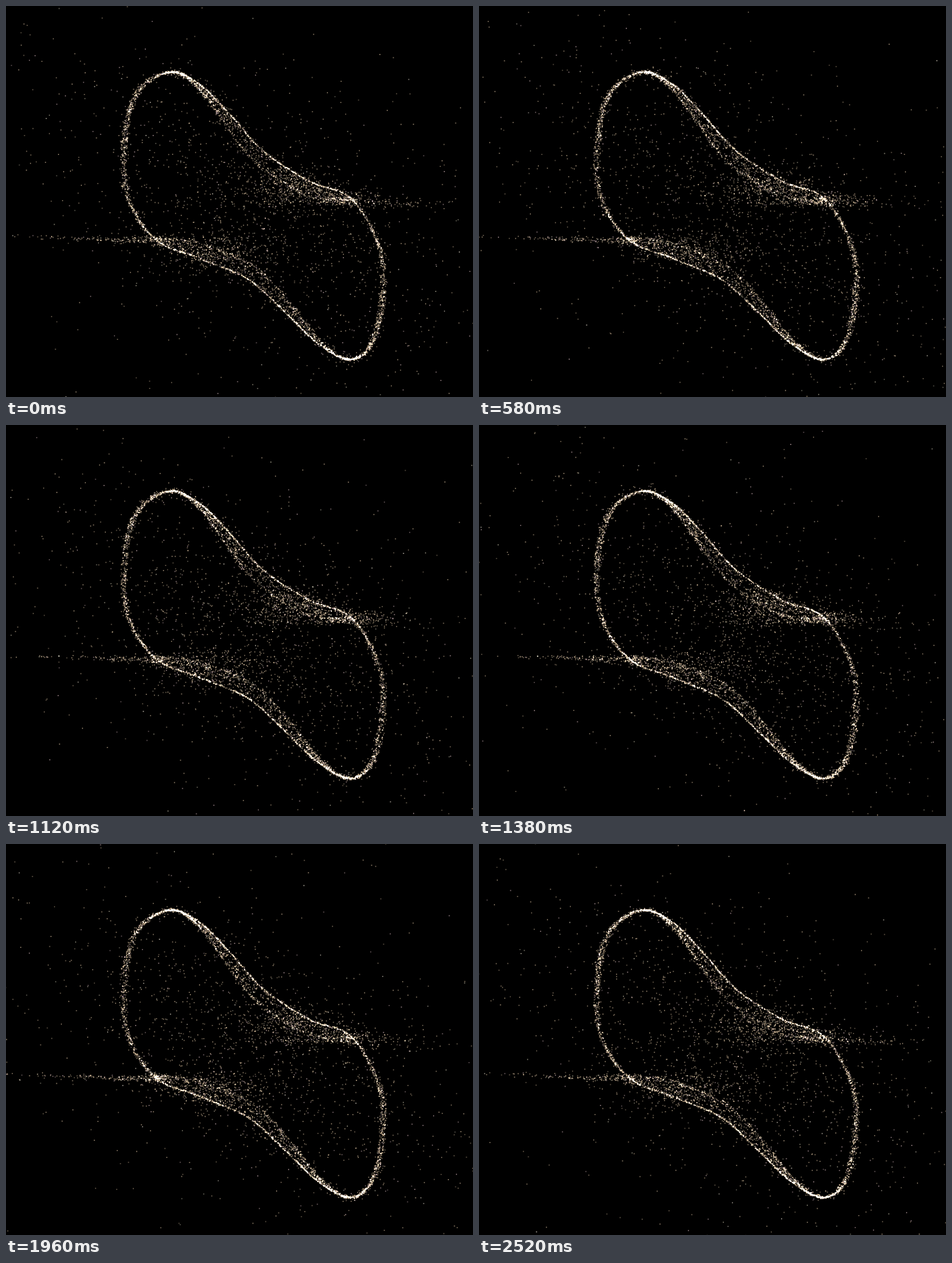
Write an HTML page with a canvas that moves like this. It is 818 px wide and 685 px high and loops after 2540 ms.

```html
<!DOCTYPE html>
<html>
<head>
<meta charset="utf-8">
<title>Limit cycle swarm</title>
<style>
html, body { margin: 0; width: 100%; height: 100%; overflow: hidden; background: #000; }
canvas { display: block; }
</style>
</head>
<body>
<canvas id="stage" width="818" height="685"></canvas>
<script>
const ctx = document.getElementById('stage').getContext('2d');
const LOOP = 2540, FRAMES = 55, LIFE = 11;

// Key points of the orbit in flow order. Each half is a diagonal of DIAG steps
// followed by a rounded side of SIDE steps.
const DIAG = 5, SIDE = 4, HALF = DIAG + SIDE;
const keys = [
  [605, 338], [530, 306], [450, 253], [390, 187], [340, 138],
  [288, 116], [236, 150], [214, 225], [216, 330],
  [262, 409], [340, 443], [425, 480], [492, 540], [545, 590],
  [600, 619], [636, 592], [653, 520], [652, 430]
];

let seed = 20417;
function rnd() {
  seed = (seed + 0x6D2B79F5) | 0;
  let h = Math.imul(seed ^ (seed >>> 15), 1 | seed);
  h = (h + Math.imul(h ^ (h >>> 7), 61 | h)) ^ h;
  return ((h ^ (h >>> 14)) >>> 0) / 4294967296;
}
const gauss = () => Math.sqrt(-2 * Math.log(1 - rnd())) * Math.cos(2 * Math.PI * rnd());
const expo = () => -Math.log(1 - rnd());

// Closed Catmull-Rom curve: position and tangent at s
function curve(s) {
  const n = keys.length, i = Math.floor(s), t = s - i;
  const [a, b, c, d] = [-1, 0, 1, 2].map(k => keys[(i + k + n) % n]);
  const at = [0, 1].map(k => {
    const p = (c[k] - a[k]) / 2;
    const q = a[k] - 2.5 * b[k] + 2 * c[k] - d[k] / 2;
    const r = (d[k] - a[k] + 3 * (b[k] - c[k])) / 2;
    return [b[k] + t * (p + t * (q + t * r)), p + t * (2 * q + 3 * t * r)];
  });
  return { x: at[0][0], y: at[1][0], dx: at[0][1], dy: at[1][1] };
}

// The band opens inwards along the diagonals and slightly outwards on the sides.
function ride(p, frame) {
  const turn = (p.phase + frame * 0.012) % 2, half = Math.floor(turn), t = turn - half;
  const diagShare = 0.67;
  const onDiag = t < diagShare;
  const f = onDiag ? t / diagShare : (t - diagShare) / (1 - diagShare);
  const width = onDiag
    ? 100 * p.u * Math.pow(f, 0.6) * Math.pow(1 - f, 1.6)
    : -10 * p.sideU * Math.sin(Math.PI * f);
  const c = curve(half * HALF + (onDiag ? f * DIAG : DIAG + f * SIDE));
  const k = width / Math.hypot(c.dx, c.dy);
  return [c.x + c.dy * k + p.dx, c.y - c.dx * k + p.dy];
}

function tint() {
  const r = rnd(), alpha = 0.36 + 0.26 * rnd();
  const rgb = r < 0.75 ? '218,192,158' : r < 0.88 ? '222,190,195' : r < 0.96 ? '205,200,175' : '255,245,228';
  return `rgba(${rgb},${alpha.toFixed(2)})`;
}

// Particles that circulate on the band, many of them close to one of its edges
const riders = Array.from({ length: 4300 }, () => {
  const kind = rnd();
  const u = kind < 0.4 ? Math.abs(gauss()) * 0.02
          : kind < 0.6 ? 1 - Math.abs(gauss()) * 0.06
          : rnd();
  const spread = rnd() < 0.1 ? 6 : kind < 0.4 ? 0.7 : 1.5;
  return { phase: rnd() * 2, u, sideU: rnd(), dx: gauss() * spread, dy: gauss() * spread, color: tint() };
});

// Short-lived particles that are still on their way to the band
const strays = [];
function spawn(count, place) {
  for (let i = 0; i < count * FRAMES / LIFE; i++) {
    const [x, y, vx, vy] = place();
    strays.push({ x, y, vx, vy, birth: Math.floor(rnd() * FRAMES), color: tint() });
  }
}
function cloud(size) {
  return () => {
    const g = gauss();
    const x = 435 + 150 * size * g, y = 365 + size * (70 * g + 105 * gauss());
    return [x, y, (y - 372) * 0.015, (435 - x) * 0.015];
  };
}
spawn(850, cloud(1));
spawn(700, cloud(1.8));
spawn(330, () => [510 + 48 * gauss(), 321 + 16 * gauss(), -1, -0.4]);
spawn(310, () => [362 + 55 * gauss(), 427 + 17 * gauss(), 1, 0.4]);
spawn(110, () => [600 - 60 * expo(), 344 + 3 * gauss(), 0.6, 0]);
spawn(160, () => {
  const d = 48 * expo();
  return [606 + d, 339 + d * 0.04 + 7 * gauss(), -1.5, 0];
});
spawn(200, () => {
  const d = 75 * expo();
  return [268 - d, 412 - d * 0.032 + (1.6 + 4 * Math.exp(-d / 60)) * gauss(), 2, 0.06];
});

function dot(x, y, color) {
  ctx.fillStyle = color;
  ctx.fillRect(x - 0.95, y - 0.95, 1.9, 1.9);
}

// Steps come in threes, held for 20, 20 and 100 ms.
function frameAt(ms) {
  const t = ms + 20, phase = t % 140;
  return 3 * Math.floor(t / 140) + (phase < 20 ? 0 : phase < 40 ? 1 : 2) - 1;
}

function draw(frame) {
  ctx.globalCompositeOperation = 'source-over';
  ctx.fillStyle = '#000';
  ctx.fillRect(0, 0, 818, 685);
  ctx.globalCompositeOperation = 'lighter';
  for (const p of riders) dot(...ride(p, frame), p.color);
  for (const p of strays) {
    const age = (frame - p.birth + FRAMES) % FRAMES;
    if (age < LIFE) dot(p.x + p.vx * age, p.y + p.vy * age, p.color);
  }
}

let shown = -1;
const start = performance.now();
function tick() {
  const frame = frameAt((performance.now() - start) % LOOP);
  if (frame !== shown) draw(shown = frame);
  requestAnimationFrame(tick);
}
tick();
</script>
</body>
</html>
```
